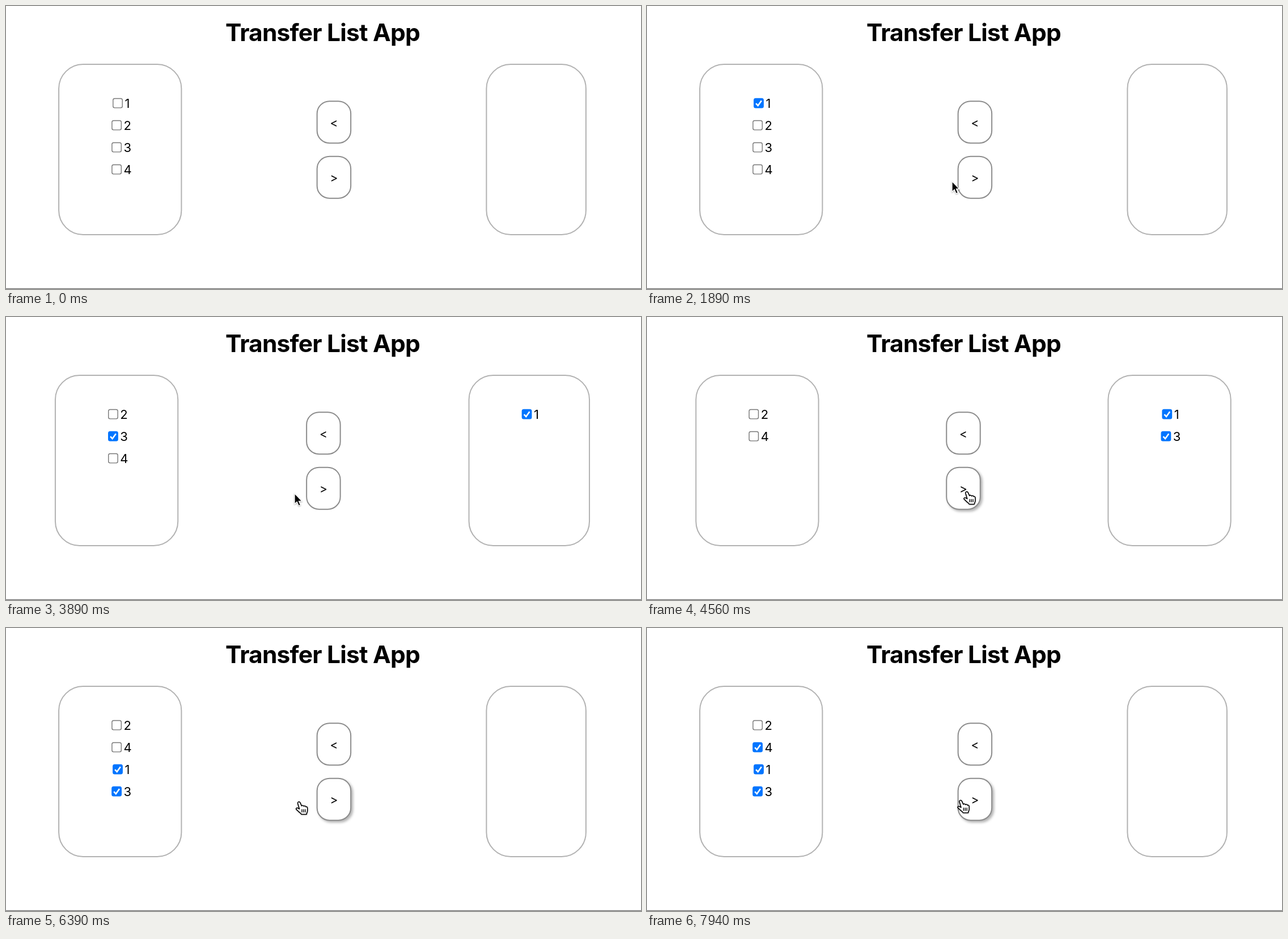
An HTML page for the animation above (8 s loop, 1120 by 500 pixels).

```html
<!DOCTYPE html>
<html lang="en">
<head>
<meta charset="utf-8">
<title>Transfer List App</title>
<style>
  html, body { margin: 0; width: 100%; height: 100%; overflow: hidden; background: #fff; }
  svg { display: block; width: 1120px; height: 500px; font-family: Inter, "Open Sans", sans-serif; }
  .title { font-size: 42.5px; font-weight: 700; letter-spacing: -.8px; font-variation-settings: "opsz" 14; }
  .label { font-size: 22px; }
  .sign { font-size: 21px; text-anchor: middle; }
  .panel { fill: #fff; stroke: #b2b2b2; stroke-width: 2; }
  .button { fill: #fff; stroke: #8c8c8c; stroke-width: 2; }
  .button.hover { filter: drop-shadow(3px 3px 2px #b4b4b4); }
  .box { fill: #fff; stroke: #767676; stroke-width: 1.4; }
  .box.hover { stroke: #4f4f4f; }
  .box.on { fill: #0075ff; stroke: #0075ff; }
  .box.on.hover { fill: #005cc8; stroke: #005cc8; }
  .tick { fill: none; stroke: #fff; stroke-width: 2.6; }
  .arrow { stroke: #fff; stroke-width: 1.3; filter: drop-shadow(0 1px 1px #0005); }
  .hand { fill: #fff; stroke: #000; stroke-width: 1.6; stroke-linejoin: round; filter: drop-shadow(0 1px 1px #0004); }
  .creases { stroke: #000; stroke-width: 1.4; }
</style>
</head>
<body>
<svg viewBox="0 0 1120 500">
  <text class="title" x="387" y="61.7">Transfer List App</text>
  <g id="app"></g>
  <rect y="498.7" width="1120" height="1.3" fill="#757575"/>
  <g id="cursor">
    <path id="arrow" class="arrow" d="M0 -.5V18L4.2 14.2L7.2 21.2L10.4 19.8L7.5 13H13Z"/>
    <g id="hand">
      <path class="hand" d="M-2 2C-2.4-.4 .8-1.6 2.2 .6L5 6.6C6 5.2 8.2 5.6 8.8 7.2C10 6 12 6.6 12.4 8.2C14 7.4 15.2 8.8 15.2 10.4V15C15.2 17.5 13.8 19 13.4 21.5H4.6C3.5 19 1 18.4-1 16L-4.6 12.6C-5.6 11-3.8 9.6-2.2 10.2L1 12Z"/>
      <path class="creases" d="M5.4 12.5V18M8.3 12.5V18M11.2 12.5V18"/>
    </g>
  </g>
</svg>
<script>
const DURATION = 8000;
const HOVER_LAG = 80;
const BOX = 16.4;
const byId = id => document.getElementById(id);

// Each move of the pointer: when it leaves and arrives, where it stops, what it presses there.
const moves = [
  { leave: 670, arrive: 1390, x: 199, y: 172, press: '1', at: 1500 },
  { leave: 1520, arrive: 1965, x: 565, y: 314, press: '>', at: 2330 },
  { leave: 2400, arrive: 2780, x: 569.5, y: 240.5 },
  { leave: 2900, arrive: 3440, x: 191, y: 212, press: '3', at: 3560 },
  { leave: 3600, arrive: 3985, x: 565, y: 314, press: '>', at: 4390 },
  { leave: 4450, arrive: 5240, x: 543.5, y: 219, press: '<', at: 5720 },
  { leave: 5980, arrive: 6240, x: 556, y: 308 },
  { leave: 6287, arrive: 6790, x: 199, y: 218, press: '4', at: 7000 },
  { leave: 7020, arrive: 7820, x: 553, y: 305 }
];
const entry = { x: 430, y: 476 };

const smooth = k => k * k * (3 - 2 * k);

// Long moves sag a little below the straight line.
function pointerAt(t) {
  const i = Math.max(0, moves.findLastIndex(move => move.leave <= t));
  const from = moves[i - 1] ?? entry, to = moves[i];
  const k = smooth(Math.min(1, Math.max(0, (t - to.leave) / (to.arrive - to.leave))));
  const dx = to.x - from.x;
  return {
    x: from.x + dx * k,
    y: from.y + (to.y - from.y) * k + .08 * Math.abs(dx) * Math.sin(Math.PI * k)
  };
}

function press(state, name) {
  const { left, right, checked } = state;
  const picked = list => list.filter(label => checked.includes(label));
  const rest = list => list.filter(label => !checked.includes(label));
  if (name === '>') return { checked, left: rest(left), right: [...right, ...picked(left)] };
  if (name === '<') return { checked, left: [...left, ...picked(right)], right: rest(right) };
  return { left, right, checked: [...checked, name] };
}

const stateAt = t => moves
  .filter(move => move.at <= t)
  .reduce((state, move) => press(state, move.press), { left: [...'1234'], right: [], checked: [] });

const itemWidth = label => label === '1' ? 37 : 40.8;
const listWidth = items => Math.max(0, ...items.map(itemWidth));

// Two panels and a column of buttons with equal space around each.
function layOut({ left, right }) {
  const padding = 175.5, column = 59.5, height = 301;
  const widths = [padding + listWidth(left), column, padding + listWidth(right)];
  const gap = (1169 - widths[0] - widths[1] - widths[2]) / 3;
  let x = -26.5 - gap / 2;
  const starts = widths.map((width, i) => x += gap + (widths[i - 1] ?? 0));
  const panels = [0, 2].map(i => ({ x: starts[i], y: 103, w: widths[i], h: height }));
  const buttons = ['<', '>'].map((name, i) =>
    ({ name, x: starts[1], y: 168.2 + 97.5 * i, w: column, h: 74 }));
  const boxes = [left, right].flatMap((items, side) => items.map((name, row) => ({
    name, w: BOX, h: BOX,
    x: panels[side].x + 93.8 + (listWidth(items) - itemWidth(name)) / 2,
    y: 163.5 + 39 * row
  })));
  return { panels, buttons, boxes };
}

const contains = ({ x, y, w, h }, p) => p.x >= x && p.x <= x + w && p.y >= y && p.y <= y + h;

const rect = (cls, { x, y, w, h }, r) =>
  `<rect class="${cls}" x="${x}" y="${y}" width="${w}" height="${h}" rx="${r}"/>`;
const text = (cls, x, y, s) =>
  `<text class="${cls}" x="${x}" y="${y}">${s.replace('<', '&lt;')}</text>`;

function drawBox(box, checked, hover) {
  const { name, x, y } = box;
  const tick = checked ? `<path class="tick" d="M${x + 3.3} ${y + 8.6}l3.6 3.8l6.2 -8.6"/>` : '';
  return rect(`box${checked ? ' on' : ''}${hover}`, box, 2.8) + tick + text('label', x + 20.6, y + 16.8, name);
}

const drawButton = (button, hover) => rect('button' + hover, button, 22)
  + text('sign', button.x + button.w / 2, button.y + 45.6, button.name);

let shown = '';
function render(t) {
  const state = stateAt(t);
  const { panels, buttons, boxes } = layOut(state);
  const visible = t >= moves[0].leave;
  const felt = pointerAt(t - HOVER_LAG);
  const hover = part => visible && contains(part, felt) ? ' hover' : '';

  const markup = panels.map(panel => rect('panel', panel, 43)).join('')
    + boxes.map(box => drawBox(box, state.checked.includes(box.name), hover(box))).join('')
    + buttons.map(button => drawButton(button, hover(button))).join('');
  if (markup !== shown) byId('app').innerHTML = shown = markup;

  const { x, y } = pointerAt(t);
  const pointing = buttons.some(hover);
  byId('cursor').style.display = visible ? '' : 'none';
  byId('hand').style.display = pointing ? '' : 'none';
  byId('arrow').style.display = pointing ? 'none' : '';
  byId('cursor').setAttribute('transform', `translate(${x} ${y})`);
}

const start = performance.now();
function frame() {
  render((performance.now() - start) % DURATION);
  requestAnimationFrame(frame);
}
frame();
</script>
</body>
</html>
```
